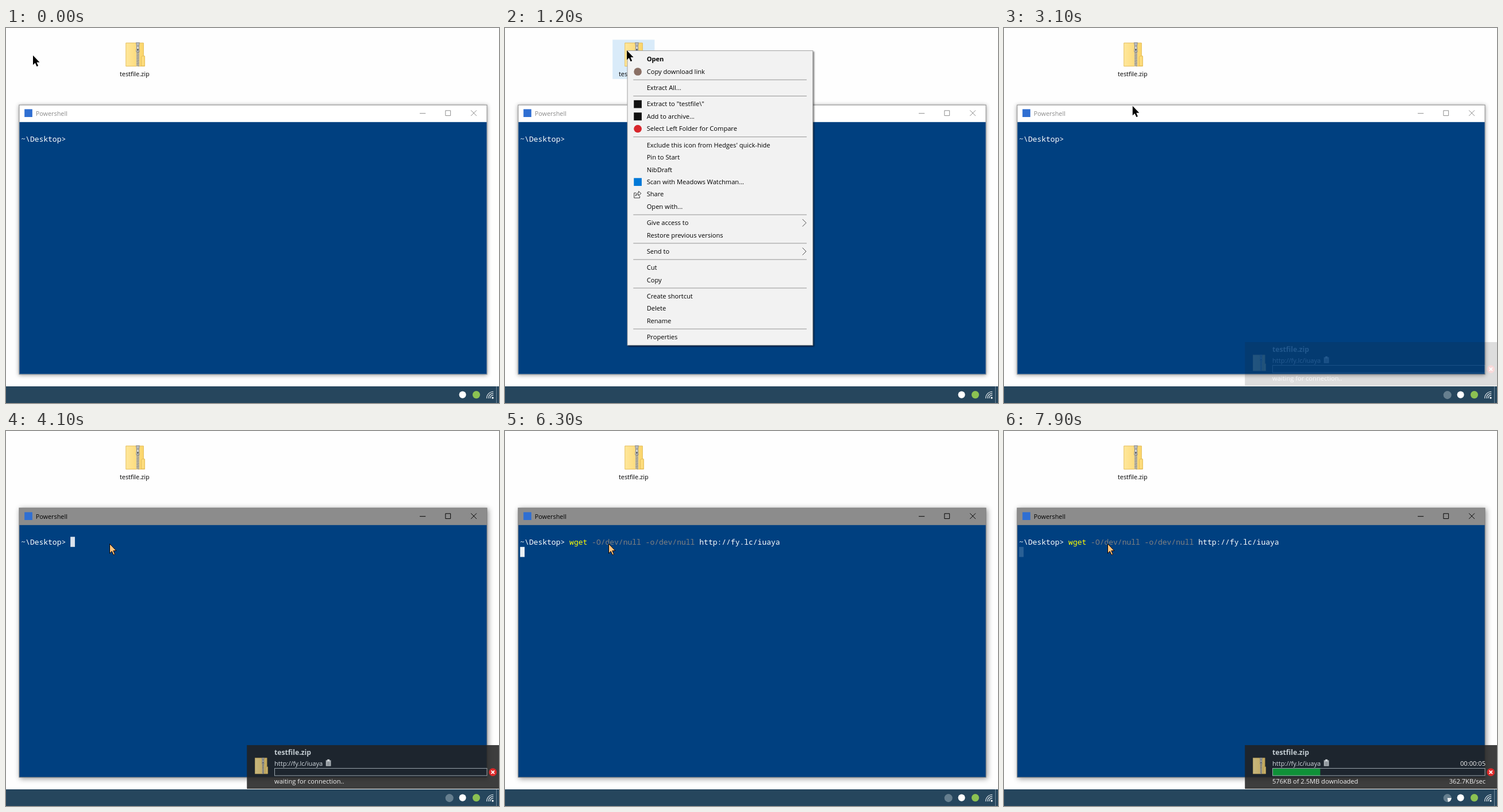
Animation of 858x653 px, one loop 8000 ms. Source, as an HTML page:

```html
<!DOCTYPE html>
<html lang="en">
<head>
<meta charset="utf-8">
<title>Copy download link</title>
<style>
  html, body { margin: 0; width: 100%; height: 100%; overflow: hidden; background: #fefefe; }
  svg { display: block; }
  text { font: 11.4px "Open Sans", "Noto Sans", sans-serif; white-space: pre; }
  .small { font-size: 11.15px; }
  .bold { font-weight: 700; }
  .console text { font: 13.333px "Noto Sans Mono", "DejaVu Sans Mono", monospace; fill: #fff; }
  .console .command { fill: #ff0; }
  .console .option { fill: #808080; }
  .frame { fill: #fff; stroke: #858585; filter: drop-shadow(0 1px 4px rgba(0,0,0,.38)); }
  .active .frame { fill: #8c8c8c; stroke: #7d7d7d; filter: drop-shadow(2px 2px 5px rgba(0,0,0,.42)); }
  .caption { fill: #8a8a8a; }
  .active .caption { fill: #000; }
  .buttons { stroke: #8a8a8a; fill: none; }
  .active .buttons { stroke: #000; }
  .sheet { fill: #f2f2f2; stroke: #a0a0a0; filter: drop-shadow(2px 2px 1.2px rgba(0,0,0,.5)); }
  .strip { fill: #d6d6d6; }
  #toast text { fill: #f0f0f0; }
  #toast .bold { font-size: 12.5px; fill: #c3ccd2; }
  #toast .link { fill: #d3dae0; }
</style>
</head>
<body>
<!-- An 880 pixel wide desktop, shown at 97.5 % -->
<svg id="stage" width="858" height="653" viewBox="0 0 880 669.744">
  <defs>
    <linearGradient id="paper"><stop stop-color="#ffe79b"/><stop offset="1" stop-color="#fbd467"/></linearGradient>
    <symbol id="zip" viewBox="0 0 34 43">
      <path d="M.5 1.5H31.5V25H33.5V42.5H.5Z" fill="url(#paper)" stroke="#e3bc58"/>
      <path d="M27.5 42V26.5Q27.5 24.5 30 24.5H33.5V42Z" fill="#fddc7c" stroke="#e3bc58"/>
      <path d="M18.800 1H24.200V42.5H18.800Z" fill="#d3cdb8"/>
      <path d="M20.400 16V42.5M22.700 15V42.5" stroke="#77736a" stroke-width="2" stroke-dasharray="1.2 1.2"/>
      <path d="M18.500 1H24.500L23.500 7H19.500Z" fill="#b9bcbf" stroke="#777" stroke-width=".7"/>
      <path d="M19.700 7H23.300L24.200 17H18.800Z" fill="#d4d6d8" stroke="#777" stroke-width=".8"/>
      <path d="M20.500 12H22.500V15H20.500Z" fill="#333"/>
    </symbol>
  </defs>

  <rect width="880" height="670" fill="#fefefe"/>
  <rect id="selection" x="192" y="21" width="75" height="70"/>
  <use href="#zip" x="213.5" y="25" width="34.5" height="44"/>
  <text class="small" x="229.5" y="86" text-anchor="middle">testfile.zip</text>

  <g id="window">
    <rect class="frame" x="23.5" y="137.5" width="835" height="481"/>
    <rect x="33" y="145" width="14" height="14" fill="#2f6fd2"/>
    <text class="caption small" x="53" y="157">Powershell</text>
    <path class="buttons" d="M738.5 152.5H749M784.5 147.5H793.5V156.5H784.5ZM830 147L840 157M840 147L830 157"/>
    <rect x="24" y="168" width="834" height="450" fill="#004080"/>
    <g class="console">
      <text x="27" y="203">~\Desktop&gt;</text>
      <g id="command">
        <text class="command" x="115" y="203">wget</text>
        <text class="option" x="155" y="203">-O/dev/null -o/dev/null</text>
      </g>
      <text id="address" x="347" y="203">http://fy.lc/iuaya</text>
      <rect id="caret" width="8" height="18" fill="#fff"/>
    </g>
  </g>

  <rect y="640" width="880" height="30" fill="#26465d"/>
  <g id="tray">
    <circle cx="791.5" cy="655.5" r="7.2" fill="#667f8f"/>
    <path id="pie" fill="#eef1f3"/>
  </g>
  <circle cx="815" cy="655" r="6.2" fill="#fff"/>
  <circle cx="839.5" cy="655" r="6.7" fill="#8cc152"/>
  <g fill="none" stroke="#e9eef1" stroke-width="1.2">
    <path d="M858 661.5A12 12 0 0 1 870 649.5M861 661.5A9 9 0 0 1 870 652.5M864 661.5A6 6 0 0 1 870 655.5"/>
    <circle cx="868.7" cy="660.5" r="1.2" fill="#fff"/>
  </g>
  <path d="M875.5 640V670" stroke="#7890a0"/>

  <g id="toast">
    <rect x="430" y="561" width="450" height="78" fill="#222" opacity=".87"/>
    <use href="#zip" x="444" y="582.5" width="23.5" height="30.5" opacity=".75"/>
    <text class="bold" x="479" y="578.5">testfile.zip</text>
    <text class="link" x="479" y="598">http://fy.lc/iuaya</text>
    <path d="M571 588H580V598.5H571Z" fill="#a9b0b5"/>
    <path d="M573.5 586.5H577.5V589.5H573.5Z" fill="#d4d9dc"/>
    <path d="M573 592H578M573 594H578M573 596H578" stroke="#666e74" stroke-width=".8"/>
    <rect id="bar" x="479" y="602" height="14" fill="#0f9138"/>
    <rect x="479.5" y="602.5" width="379" height="13" fill="none" stroke="#9da7ae"/>
    <text id="status" x="479" y="629.5"/>
    <text id="remaining" x="859.5" y="598" text-anchor="end"/>
    <text id="speed" x="859.5" y="629.5" text-anchor="end"/>
    <circle cx="869" cy="609.3" r="7" fill="#dd2a2a"/>
    <path d="M866.2 606.500L871.800 612.100M871.800 606.500L866.200 612.100" stroke="#fff" stroke-width="1.8"/>
  </g>

  <g id="menu"></g>
  <g id="chosen"></g>
  <g id="pointer">
    <path id="arrow" d="M.5 0V17L4.300 13.400 7.200 19.800 9.800 18.700 7.100 12.300H12.300Z"/>
    <path id="hourglass" d="M11 1H22.500V4H21.500C21.500 8 18.500 9 18.500 10S21.500 12 21.500 16H22.500V19H11V16H12C12 12 15 11 15 10S12 8 12 4H11Z"/>
  </g>
</svg>
<script>
const $ = id => document.getElementById(id);
const LOOP = 8000, STEP = 100;
const ROW = 22, GAP = 7, FIRST_ROW = 45;   // menu layout
const CELL = 8, LINE = 18;                 // console layout

const square = color => y => `<rect x="230" y="${y - 7}" width="14" height="14" fill="${color}"/>`;
const disc = color => y => `<circle cx="237" cy="${y}" r="7" fill="${color}"/>`;
const shareIcon = y => `<path transform="translate(229 ${y - 7})" fill="none" stroke="#333"
  d="M5 4.5H1.5V13.5H11.5V10M4 10Q4.5 5 9.5 4.5V1.5L14 5.5 9.5 9.5V7Q6 7 4 10Z"/>`;
const arrowIcon = y => `<path d="M531 ${y - 6.5}L537.5 ${y}L531 ${y + 6.5}" fill="none" stroke="#444"/>`;

// Groups are parted by separators; an item is [label, icon].
const groups = [
  [["Open"], ["Copy download link", disc("#8a6f64")]],
  [["Extract All..."]],
  [['Extract to "testfile\\"', square("#111")], ["Add to archive...", square("#111")],
   ["Select Left Folder for Compare", disc("#d8262c")]],
  [["Exclude this icon from Hedges' quick-hide"], ["Pin to Start"], ["NibDraft"],
   ["Scan with Meadows Watchman...", square("#0078d7")], ["Share", shareIcon], ["Open with..."]],
  [["Give access to", arrowIcon], ["Restore previous versions"]],
  [["Send to", arrowIcon]],
  [["Cut"], ["Copy"]],
  [["Create shortcut"], ["Delete"], ["Rename"]],
  [["Properties"]]
];

const strip = (id, row) =>
  `<rect id="${id}" class="strip" x="221" y="${FIRST_ROW + row * ROW}" width="326" height="${ROW}"/>`;

const itemMarkup = ([label, icon], y) =>
  `<text x="253" y="${y + 4}" ${label === "Open" ? 'class="bold"' : ""}>${label}</text>${icon ? icon(y) : ""}`;

function buildMenu() {
  let top = FIRST_ROW, rows = "";
  groups.forEach((group, i) => {
    if (i) {
      rows += `<path d="M229 ${top + GAP / 2}H538.5" stroke="#929292"/>`;
      top += GAP;
    }
    for (const item of group) {
      rows += itemMarkup(item, top + ROW / 2);
      top += ROW;
    }
  });
  $("menu").innerHTML =
    `<rect class="sheet" x="218.5" y="40.5" width="331" height="526"/>${strip("hover", 0)}${rows}`;
  $("chosen").innerHTML = strip("pressed", 1) + itemMarkup(groups[0][1], FIRST_ROW + 1.5 * ROW);
}

const ramp = (t, from, to) => Math.min(1, Math.max(0, (t - from) / (to - from)));
const smooth = x => x * x * (3 - 2 * x);
const show = (id, on) => $(id).style.display = on ? "" : "none";
const fade = (id, opacity) => { show(id, opacity > 0); $(id).style.opacity = opacity; };
const set = (id, attrs) => { for (const k in attrs) $(id).setAttribute(k, attrs[k]); };

// Each move: start, end, target point.
const moves = [[0, 500, 216.5, 48], [600, 700, 217, 40], [1400, 1900, 273.5, 77], [2800, 3400, 184.6, 201.5]];

function pointerAt(t) {
  let x = 47.7, y = 49;
  for (const [from, to, tx, ty] of moves) {
    const k = smooth(ramp(t, from, to));
    x += (tx - x) * k;
    y += (ty - y) * k;
  }
  return [x, y];
}

function drawDesktop(t, x, y) {
  const inConsole = y > 168;
  set("pointer", { transform: `translate(${x} ${y})` });
  set("arrow", { fill: inConsole ? "#ffc37d" : "#000", stroke: inConsole ? "#000" : "none" });
  show("hourglass", t >= 2300 && t < 2900);

  show("selection", x > 192 && t < 2300);
  set("selection", { fill: t < 1000 ? "#e5f3ff" : "#d9ebf9" });

  fade("menu", t < 2300 ? ramp(t, 900, 1200) : 0);
  show("hover", t >= 1500 && y > FIRST_ROW);
  set("hover", { y: FIRST_ROW + (y < FIRST_ROW + ROW ? 0 : ROW) });
  fade("chosen", t >= 2300 ? .7 * (1 - ramp(t, 2300, 2500)) : 0);
}

function drawConsole(t) {
  $("window").classList.toggle("active", t >= 4100);
  show("command", t >= 5200);
  show("address", t >= 5800);
  const entered = t >= 6200;
  const column = entered ? 0 : t >= 5800 ? 58 : t >= 5200 ? 40 : 11;
  set("caret", { x: 27 + column * CELL, y: 189 + (entered ? LINE : 0) });
  const tick = Math.floor(t / 200) * 200;
  const pulse = (1 + Math.cos((tick - 6200) / 1050 * 2 * Math.PI)) / 2;
  fade("caret", t >= 4100 ? .16 + .76 * pulse : 0);
}

function drawTransfer(t) {
  const started = t >= 6400, updated = t >= 7400;
  const leaving = 1 - Math.pow(ramp(t, 5300, 6000), 1.3);
  fade("toast", started ? ramp(t, 6300, 6600) : ramp(t, 3000, 3600) * leaving);
  show("tray", t >= 3000);

  const part = started ? .0125 + .2125 * ramp(t, 7300, 7500) : 0;
  set("bar", { width: 380 * part });
  const angle = part * 2 * Math.PI;
  set("pie", { d: `M791.5 655.5h7.2A7.2 7.2 0 0 1 ${791.5 + 7.2 * Math.cos(angle)} ${655.5 + 7.2 * Math.sin(angle)}Z` });

  $("status").textContent = started ? `${updated ? 576 : 32}KB of 2.5MB downloaded` : "waiting for connection..";
  $("remaining").textContent = started ? (updated ? "00:00:05" : "00:00:19") : "";
  $("speed").textContent = started ? (updated ? "362.7KB/sec" : "128.0KB/sec") : "";
}

const start = performance.now();

function draw() {
  const t = Math.floor((performance.now() - start) % LOOP / STEP) * STEP;
  drawDesktop(t, ...pointerAt(t));
  drawConsole(t);
  drawTransfer(t);
  requestAnimationFrame(draw);
}

buildMenu();
draw();
</script>
</body>
</html>
```
